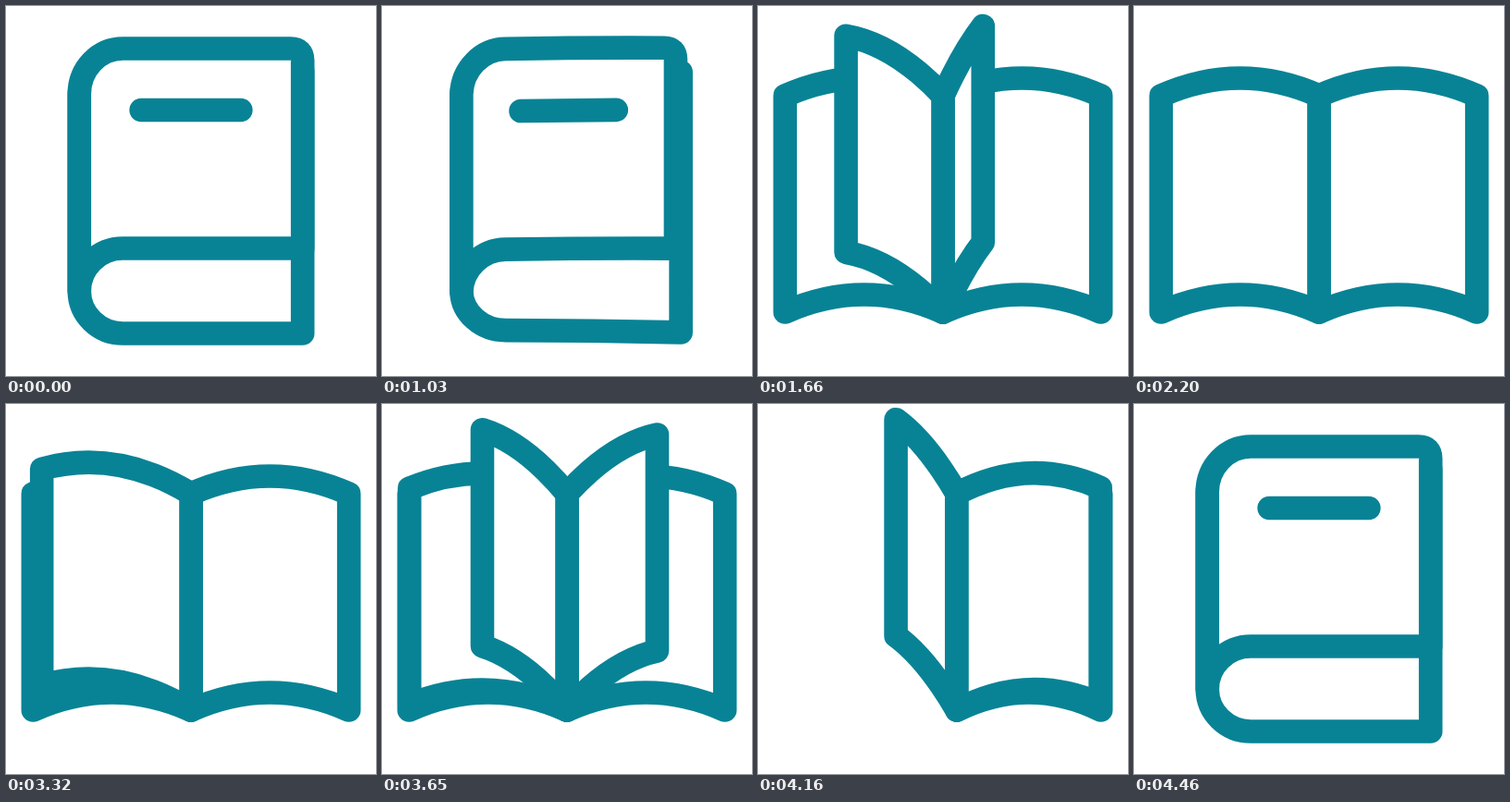
Animation, 400 px wide and 400 px high, one loop 4520 ms. Source, as an HTML page with a canvas:

```html
<!DOCTYPE html>
<html lang="en">
<head>
<meta charset="utf-8">
<title>Book</title>
<style>
  html, body { margin: 0; width: 100%; height: 100%; overflow: hidden; background: #fff; }
  canvas { display: block; width: 100vw; height: 100vh; }
</style>
</head>
<body>
<canvas id="stage" width="400" height="400"></canvas>
<script>
const ctx = document.getElementById('stage').getContext('2d');
const LOOP = 4520, STEP = 30, LAST = 40;
const PAGE_CENTERS = [17.8, 23.4, 30.3]; // step at which each page stands upright
const RISE = 8.2, FALL = 9.6;            // steps before and after upright

const clamp = (v, lo, hi) => Math.min(hi, Math.max(lo, v));
const mix = (a, b, t) => a + (b - a) * t;
const mixPoint = (a, b, t) => [mix(a[0], b[0], t), mix(a[1], b[1], t)];
const ease = t => { t = clamp(t, 0, 1); return t * t * (3 - 2 * t); };
// Horizontal reach of a turning leaf: 1 = flat right, -1 = flat left.
const reachAt = v => { v = clamp(v, -1, 1); return (v * v * v - 3 * v) / 2; };
const lift = reach => Math.sqrt(Math.max(0, 1 - reach * reach));

// Two joined cubics from the spine to the free side,
// blending a rounded corner plus line (open = 0) into an arch (open = 1).
function edge(spine, free, bulge, open) {
  const [sx, sy] = spine, [fx, fy] = free;
  const r = 47, k = 0.448;
  const corner = [sx + r, fy];
  const closed = [
    spine, [sx, mix(fy, sy, k)], [sx + r * k, fy], corner,
    mixPoint(corner, free, 1 / 3), mixPoint(corner, free, 2 / 3), free
  ];
  const top = [(sx + fx) / 2, (sy + fy) / 2 - bulge];
  const a = mixPoint(spine, top, 0.25), b = mixPoint(top, free, 0.25);
  const split = mixPoint(a, b, 0.25);
  const arch = [
    spine, mixPoint(spine, a, 2 / 3), mixPoint(split, a, 2 / 3), split,
    mixPoint(split, b, 2 / 3), mixPoint(free, b, 2 / 3), free
  ];
  return closed.map((p, i) => mixPoint(p, arch[i], open));
}

function curve(points) {
  for (let i = 1; i < points.length; i += 3) {
    ctx.bezierCurveTo(...points[i], ...points[i + 1], ...points[i + 2]);
  }
}

function leaf({ x, spineTop, spineBottom, freeX, top, bottom, bulge, open = 1, radius = 0 }) {
  const upper = edge([x, spineTop], [freeX - radius, top], bulge, open);
  const lower = edge([x, spineBottom], [freeX, bottom], bulge, open).reverse();
  ctx.beginPath();
  ctx.moveTo(...upper[0]);
  curve(upper);
  ctx.quadraticCurveTo(freeX, top, freeX, top + radius);
  ctx.lineTo(freeX, bottom);
  curve(lower);
  ctx.closePath();
  ctx.fill();
  ctx.stroke();
}

function drawBook(k) {
  const open = ease(k / 7.5), settle = ease((k - 10) / 8);
  const x = mix(79.3, 215, open) - 15 * settle;
  const right = mix(320.7, 370.7, open);
  const width = right - x;
  const spineTop = mix(95, 97, open), spineBottom = mix(308, 331, open);
  const hinge = { x, spineTop, spineBottom };

  leaf({
    ...hinge, freeX: right, top: mix(70, 97, open), bottom: mix(354, 331, open),
    bulge: 38, open
  });

  const reach = reachAt(k / 7.75 - 1);
  const top = 46 + 45 * open * open + 6 * settle - 82 * lift(reach) * open;
  leaf({
    ...hinge, freeX: x + width * reach, top, bottom: top + mix(216, 234, open),
    bulge: 38 * Math.abs(reach), open, radius: 13 * (1 - open)
  });

  if (reach > 0.2) {
    ctx.beginPath();
    for (const f of [0.277, 0.723]) {
      ctx.lineTo(x + width * reach * f, top + 66.5 + (1 - f) * open * (spineTop - top));
    }
    ctx.stroke();
  }

  const pages = PAGE_CENTERS
    .map(center => (k - center) / (k < center ? RISE : FALL))
    .filter(v => Math.abs(v) < 1);
  const rightPages = pages.filter(v => v < 0).reverse();
  const leftPages = pages.filter(v => v >= 0);
  for (const v of [...rightPages, ...leftPages]) {
    const reach = reachAt(v);
    const top = 97 - (v < 0 ? 78 : 82) * lift(reach);
    leaf({
      ...hinge, freeX: x + width * reach, top, bottom: top + 234,
      bulge: 38 * Math.abs(reach)
    });
  }
}

function stepAt(t) {
  if (t < 3320) return clamp(Math.floor((t - 1000) / STEP), 0, LAST);
  return Math.max(0, 38 - Math.floor((t - 3320) / STEP));
}

ctx.lineWidth = 25.6;
ctx.lineCap = ctx.lineJoin = 'round';
ctx.strokeStyle = '#088395';
ctx.fillStyle = '#fff';

const start = performance.now();
function frame() {
  ctx.fillRect(0, 0, 400, 400);
  drawBook(stepAt((performance.now() - start) % LOOP));
  requestAnimationFrame(frame);
}
frame();
</script>
</body>
</html>
```
